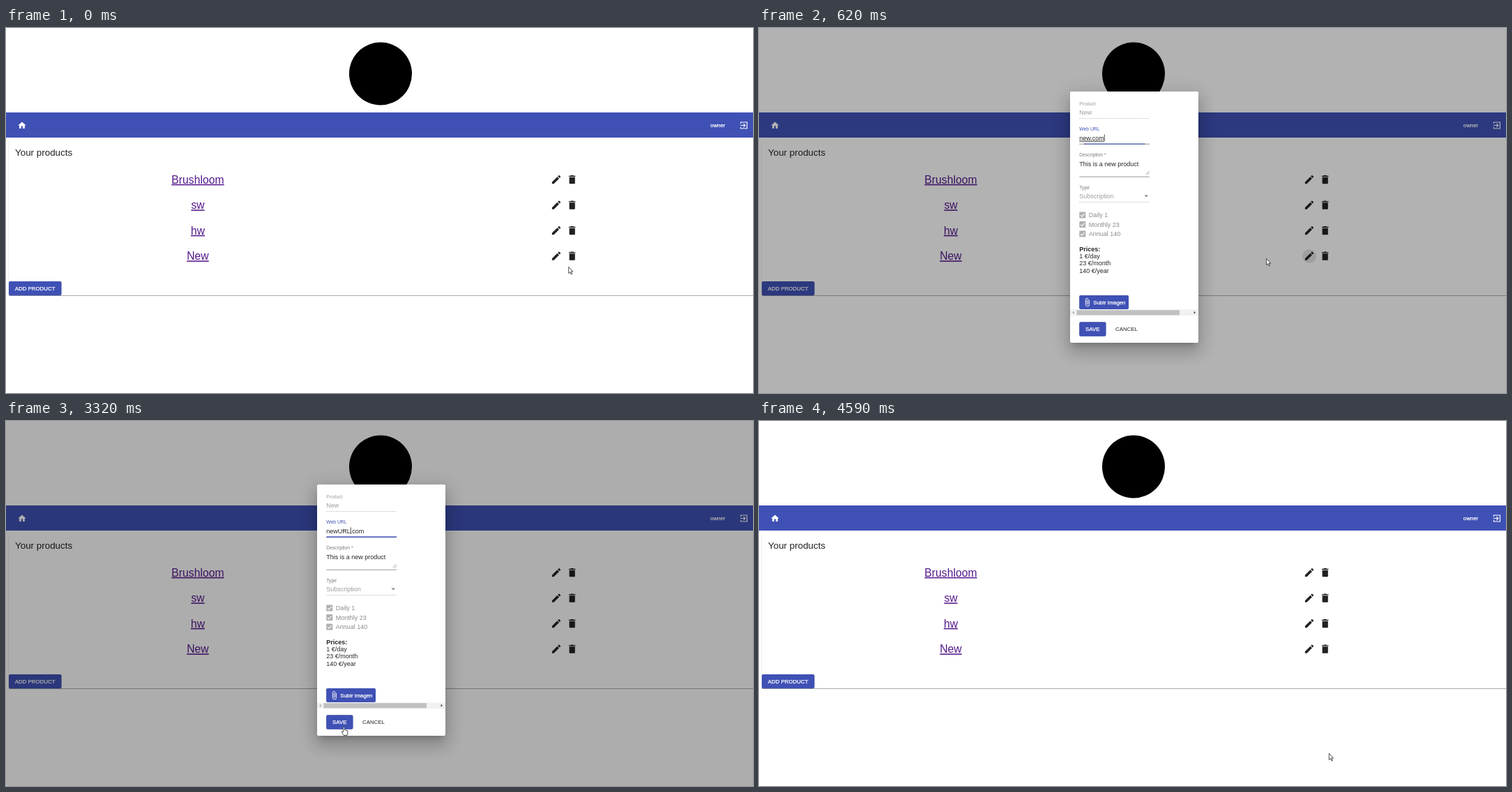
An HTML page for the animation above (4660 ms loop, 1071 px wide and 523 px high).

```html
<!DOCTYPE html>
<html lang="en">
<head>
<meta charset="utf-8">
<title>Product list</title>
<style>
  html, body { margin: 0; width: 100%; height: 100%; overflow: hidden; background: #fff; }
  svg { position: absolute; left: 0; top: 0; display: block; }
  text { font-family: "Liberation Sans", Arial, sans-serif; white-space: pre; }
  #dialog {
    position: absolute; left: 446px; top: 91px; width: 184px; height: 360px;
    background: #fff; border-radius: 2px;
    box-shadow: 0 6px 8px -4px rgba(0,0,0,.2), 0 13.5px 21px 2px rgba(0,0,0,.14), 0 5px 26px 4.5px rgba(0,0,0,.12);
  }
  .link { font-size: 15.75px; fill: #551a8b; text-anchor: middle; text-decoration: underline; }
  .btn { font-size: 7.875px; fill: #fff; stroke: #fff; stroke-width: .25px; }
  .label { font-size: 6.75px; fill: #7b7b7b; }
  .field { font-size: 9px; fill: #262626; }
  .off { fill: #9c9c9c; }
  .dots { stroke: #aaa; stroke-width: .9; stroke-dasharray: 1 1.25; }
  .line { stroke: #8c8c8c; stroke-width: .9; }
  .raised { fill: #3f51b5; filter: drop-shadow(0 .8px .6px rgba(0,0,0,.3)); }
</style>
</head>
<body>
<svg width="1071" height="523" viewBox="0 0 1071 523">
  <defs>
    <path id="home" d="M2 12L12 3 22 12H19V20H14V14H10V20H5V12Z" fill="#fff"/>
    <path id="exit" d="M4 8V4H20V20H4V16M3 12H15M11 7.7L15.5 12 11 16.3" fill="none" stroke="#fff" stroke-width="2"/>
    <path id="pencil" d="M3 17.2V21H6.8L17.8 9.9 14.1 6.2ZM15.1 5.1L17.4 3H18L21 6V6.6L18.9 8.9Z"/>
    <path id="trash" d="M6 7H18V20L17 21H7L6 20ZM5 4H8.5L9.5 3H14.5L15.5 4H19V6H5Z"/>
    <path id="clip" d="M17.2 6V17.5A4.7 4.7 0 0 1 7.8 17.5V5A3.2 3.2 0 0 1 14.2 5V15.5A1.7 1.7 0 0 1 10.8 15.5V6" fill="none" stroke="#fff" stroke-width="1.5"/>
  </defs>
  <rect width="1071" height="523" fill="#fff"/>
  <circle cx="537" cy="65.5" r="45"/>
  <rect y="121" width="1071" height="36" fill="#3f51b5"/>
  <use href="#home" transform="translate(16.2 132.7) scale(.5625)"/>
  <text class="btn" x="1009.8" y="142.2">owner</text>
  <use href="#exit" transform="translate(1051.2 132.8) scale(.5625)"/>
  <path d="M3.5 162V383" stroke="#efefef"/>
  <path d="M4 383.5H1071" stroke="#ababab"/>
  <text x="13" y="183" font-size="13.4" fill="#212121">Your products</text>
  <circle id="halo" cx="789" cy="327" r="10"/>
  <g id="rows"></g>
  <rect class="raised" x="4" y="363" width="75.5" height="20.3" rx="2.2"/>
  <text class="btn" x="12.8" y="376">ADD PRODUCT</text>
  <rect id="shade" width="1071" height="523"/>
</svg>

<div id="dialog">
<svg width="184" height="360" viewBox="446 91 184 360">
  <text class="label off" x="459.3" y="110.7">Product</text>
  <text class="field off" x="459.3" y="124.2">New</text>
  <path class="dots" d="M459.3 129.6H560"/>

  <text class="label" id="urlLabel" x="459.3" y="147.3">Web URL</text>
  <text class="field" id="url" x="459.3" y="160.8"></text>
  <rect id="caret" y="152.4" width=".8" height="9.6" fill="#222"/>
  <path class="line" d="M459.3 166.3H560"/>
  <path id="focusLine" stroke="#3f51b5" stroke-width="1.5"/>

  <text class="label" x="459.3" y="184">Description *</text>
  <text class="field" x="459.3" y="197.8">This is a new product</text>
  <path d="M555 210l4.6-4.6M557.6 210.2l2-2" stroke="#777" stroke-width=".7"/>
  <path class="line" d="M459.3 213.2H560"/>

  <text class="label" x="459.3" y="230.8">Type</text>
  <text class="field off" x="459.3" y="244.2">Subscription</text>
  <path d="M552.4 239.6h5.6l-2.8 2.8z" fill="#888"/>
  <path class="dots" d="M459.3 249.6H560"/>

  <g id="checks"></g>
  <g id="prices"></g>

  <rect class="raised" x="459.2" y="383" width="70.8" height="20" rx="2.2"/>
  <use href="#clip" transform="translate(463.9 386.4) scale(.5625)"/>
  <text class="btn" x="479.2" y="395.8">Subir imagen</text>

  <rect x="446" y="403.4" width="184" height="8.8" fill="#f1f1f1"/>
  <rect x="455.5" y="404.2" width="147.5" height="7.2" fill="#c1c1c1"/>
  <path d="M451.6 405.8v4l-2.4-2z" fill="#a3a3a3"/>
  <path d="M623.6 405.8v4l2.4-2z" fill="#404040"/>

  <rect class="raised" x="459.2" y="421.3" width="38.3" height="20.4" rx="2.2"/>
  <clipPath id="saveClip"><rect x="459.2" y="421.3" width="38.3" height="20.4" rx="2.2"/></clipPath>
  <circle id="ripple" cx="481" cy="435" fill="#fff" clip-path="url(#saveClip)"/>
  <text class="btn" x="468" y="434.4">SAVE</text>
  <text x="511" y="434.4" font-size="7.875" fill="#262626">CANCEL</text>
</svg>
</div>

<svg width="1071" height="523" viewBox="0 0 1071 523">
  <g id="cursor" stroke="#222" stroke-width=".8" stroke-linejoin="round">
    <path id="arrow" d="M.3 .3V9.6L2.4 7.6 3.9 11 5.3 10.4 3.8 7H6.5Z" fill="#fff"/>
    <path id="beam" d="M-1.8 -4.5H1.8M0 -4.5V4.5M-1.8 4.5H1.8"/>
    <path id="hand" d="M-1 1Q0 -1 1 1V4.2L5.5 5.5V9L4.5 12H0L-3 7.5Q-3 5.5 -1 7.2Z" fill="#fff"/>
  </g>
</svg>

<script>
const LOOP = 4660, STEP = 80;
const OPEN = 406, FOCUS = 620, BLUR = 3650, CLOSE = 4110;
const KEYS = [1840, 1900, 2080];

// Pointer key points: time, x, y
const WAY = [[50, 806.4, 342], [300, 788, 328.5], [540, 788, 328.5], [770, 613, 333],
  [1070, 515, 231], [1450, 513, 161.7], [2600, 513, 161.7], [2760, 594, 230],
  [3000, 457, 405], [3240, 487, 441], [3400, 481, 435], [CLOSE, 480, 435], [4590, 817, 476]];

const $ = id => document.getElementById(id);
const clamp = v => Math.min(1, Math.max(0, v));
const show = (id, on) => $(id).style.display = on ? "" : "none";
const set = (id, attrs) => { for (const k in attrs) $(id).setAttribute(k, attrs[k]); };

function bezier(x1, y1, x2, y2) {
  const at = (a, b, s) => 3 * a * s * (1 - s) ** 2 + 3 * b * s * s * (1 - s) + s ** 3;
  return v => {
    if (v <= 0 || v >= 1) return clamp(v);
    let lo = 0, hi = 1;
    for (let i = 0; i < 24; i++) {
      const mid = (lo + hi) / 2;
      if (at(x1, x2, mid) < v) lo = mid; else hi = mid;
    }
    return at(y1, y2, lo);
  };
}
const fade = bezier(.25, .8, .25, 1);
const enter = bezier(0, 0, .2, 1);

// Motion advances in even steps, as in a screen recording; the rhythm shifts once while typing
function hold(t) {
  const offset = t < KEYS[2] ? 60 : 30;
  return Math.max(0, offset + STEP * Math.floor((t - offset) / STEP));
}

function build() {
  $("rows").innerHTML = ["Brushloom", "sw", "hw", "New"].map((name, i) => {
    const y = 217.2 + i * 36.5;
    const icon = (id, x) =>
      `<use href="#${id}" fill="#212121" transform="translate(${x - 8.2} ${y - 8.2}) scale(.683)"/>`;
    return `<text class="link" x="275" y="${y + 5.6}">${name}</text>` + icon("pencil", 789) + icon("trash", 811.7);
  }).join("");

  $("checks").innerHTML = ["Daily 1", "Monthly 23", "Annual 140"].map((name, i) => {
    const y = 268.1 + i * 13.5;
    return `<rect x="459.3" y="${y - 4.5}" width="9" height="9" rx="1" fill="#b0b0b0"/>
      <path d="M461 ${y}l2 2 3.8-3.9" fill="none" stroke="#fff" stroke-width="1.1"/>
      <text class="field" style="fill:#8a8a8a" x="472.8" y="${y + 3.2}">${name}</text>`;
  }).join("");

  $("prices").innerHTML = ["Prices:", "1 €/day", "23 €/month", "140 €/year"].map((line, i) =>
    `<text class="field" x="459.3" y="${320 + i * 10.2}" font-weight="${i ? 400 : 700}">${line}</text>`).join("");
}

function pointer(t) {
  const i = WAY.findIndex(p => p[0] > t);
  if (i < 1) return WAY.at(i).slice(1);
  const [t0, x0, y0] = WAY[i - 1], [t1, x1, y1] = WAY[i];
  const k = (t - t0) / (t1 - t0);
  return [x0 + (x1 - x0) * k, y0 + (y1 - y0) * k];
}

function drawPointer(t) {
  const [x, y] = t < WAY[0][0] ? WAY[0].slice(1) : pointer(t);
  const open = t >= FOCUS && t <= CLOSE;
  const inField = x > 459 && x < 560 && (y > 151 && y < 168 || y > 188 && y < 212);
  const onSave = x > 459 && x < 498 && y > 421 && y < 442;
  const kind = open && inField ? "beam" : open && onSave ? "hand" : "arrow";
  for (const id of ["arrow", "beam", "hand"]) show(id, id === kind);
  set("cursor", { transform: `translate(${x} ${y})` });
}

function drawUrl(t) {
  const count = KEYS.filter(key => t >= key).length;
  const url = $("url");
  url.textContent = `new${"URL".slice(0, count)}.com`;

  const focused = t >= FOCUS && t < BLUR;
  url.style.textDecoration = focused && !count ? "underline" : "none";
  $("urlLabel").style.fill = focused ? "#3f51b5" : "";

  const grow = fade((t - FOCUS + STEP) / 300), half = 50.35 * (.5 + grow / 2);
  set("focusLine", {
    d: `M${509.65 - half} 166.2H${509.65 + half}`,
    opacity: t < FOCUS ? 0 : grow * (1 - clamp((t - BLUR + STEP) / 240))
  });

  const blinkOff = t >= 1150 && t < 1670 || t >= 2600 && t < 3160;
  show("caret", focused && !blinkOff);
  set("caret", { x: 459.3 + url.getSubStringLength(0, count ? 3 + count : 7) });
}

function draw(now) {
  const t = now % LOOP, held = hold(t);

  set("shade", { opacity: .32 * (fade((held - OPEN) / 400) - fade((held - CLOSE) / 340)) });
  set("halo", { opacity: held >= 300 && held < 700 ? .11 : 0 });

  const k = enter((held - OPEN) / 150);
  const dialog = $("dialog").style;
  dialog.opacity = k * (1 - clamp((held - CLOSE) / 75));
  dialog.transform = `scale(${.7 + .3 * k})`;

  drawUrl(t);
  const press = clamp((held - BLUR + STEP) / 360);
  set("ripple", { r: 30 * press, opacity: t >= BLUR ? .2 * (1 - press) : 0 });
  drawPointer(held);
}

build();
const start = performance.now();
function loop() {
  draw(performance.now() - start);
  requestAnimationFrame(loop);
}
loop();
</script>
</body>
</html>
```
